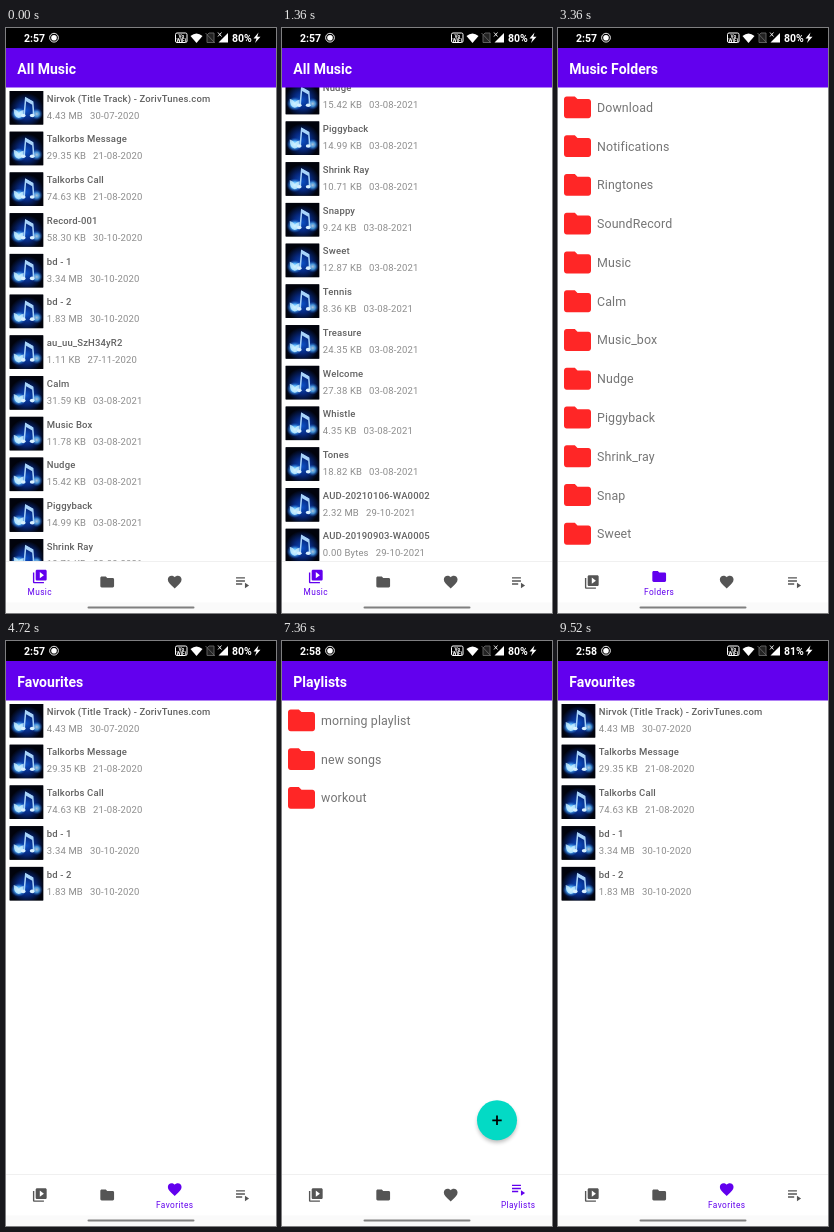
Recreate the animation shown at these times as an HTML page. Size 270 px wide and 585 px high, loop 9.6 s.

```html
<!DOCTYPE html>
<html lang="en">
<head>
<meta charset="utf-8">
<title>Music player</title>
<style>
  html, body { margin: 0; width: 100%; height: 100%; overflow: hidden; background: #fff; }
  svg { display: block; width: 270px; height: 585px; font-family: Roboto, sans-serif; }
  .name { font-size: 9.5px; font-weight: 500; letter-spacing: .15px; fill: #616161; }
  .info { font-size: 9.5px; letter-spacing: .15px; fill: #8c8c8c; }
  .folder { font-size: 12.4px; letter-spacing: .12px; fill: #757575; }
  .title { font-size: 14px; font-weight: 700; fill: #fff; }
  .label { font-size: 8.3px; letter-spacing: .4px; text-anchor: middle; }
  .status { font-size: 10.5px; font-weight: 700; fill: #fff; }
  .badge { font-size: 4.800px; font-weight: 700; fill: #fff; text-anchor: middle; }
</style>
</head>
<body>
<svg viewBox="0 0 270 585">
  <defs>
    <radialGradient id="glowBlue" cx=".5" cy=".58" r=".52">
      <stop offset="0" stop-color="#0c4fc4"/>
      <stop offset=".5" stop-color="#06287e"/>
      <stop offset="1" stop-color="#01030c"/>
    </radialGradient>
    <radialGradient id="glowWhite">
      <stop offset="0" stop-color="#e6faff"/>
      <stop offset=".45" stop-color="#58b8ff"/>
      <stop offset="1" stop-color="#0c4fc4" stop-opacity="0"/>
    </radialGradient>
    <filter id="soft" x="-50%" y="-50%" width="200%" height="200%"><feGaussianBlur stdDeviation="2.2"/></filter>
    <clipPath id="navClip"><rect y="534" width="270" height="40.5"/></clipPath>
    <path id="folderIcon" d="M10 4H4c-1.1 0-2 .9-2 2v12c0 1.1.9 2 2 2h16c1.1 0 2-.9 2-2V8c0-1.1-.9-2-2-2h-8z"/>
    <g id="thumb">
      <rect width="33.5" height="33.5" fill="#01030c"/>
      <rect width="33.5" height="33.5" fill="url(#glowBlue)"/>
      <ellipse cx="9" cy="23" rx="8" ry="7" fill="url(#glowWhite)"/>
      <ellipse cx="27" cy="23" rx="6" ry="6" fill="url(#glowWhite)" opacity=".75"/>
      <path d="M4 18q4 1 5 4q2-3 5-3q0 7-5 8q-5-1-5-9z" fill="#c9efff" opacity=".8"/>
      <path d="M14.500 24L16 7l7 4 1 13" fill="none" stroke="#a9d4fa" stroke-width="1.500"/>
      <path d="M16 6.500l7 4v3.500l-7-4z" fill="#a9d4fa"/>
      <ellipse cx="13.500" cy="24.500" rx="2.400" ry="1.800" fill="#d8f0ff"/>
      <ellipse cx="22.500" cy="24.500" rx="2.400" ry="1.800" fill="#d8f0ff"/>
    </g>
  </defs>
  <rect width="270" height="585" fill="#fff"/>
  <g id="screens"></g>
  <path id="overscroll" fill="#6200ee"/>

  <rect width="270" height="20"/>
  <rect y="20" width="270" height="39.500" fill="#6200ee"/>
  <text id="title" class="title" x="11.300" y="45.800"></text>
  <text id="clock" class="status" x="18" y="13.600"></text>
  <circle cx="48" cy="9.700" r="4.400" fill="none" stroke="#fff" stroke-width=".9"/>
  <circle cx="48" cy="9.700" r="2.800" fill="#fff"/>
  <rect x="169.500" y="5" width="11.500" height="9.500" rx="1.500" fill="none" stroke="#fff"/>
  <text class="badge" x="175.300" y="9.500">Vo</text>
  <text class="badge" x="175.300" y="13.700">WiFi</text>
  <path d="M184.500 8q6-5 12 0l-6 7z" fill="#fff"/>
  <path d="M201 7l2-2h5v9.500h-7zM199.500 5l9.500 10" fill="#222" stroke="#666" stroke-width=".9"/>
  <path d="M222 5v9.500h-9.500z" fill="#fff"/>
  <path d="M212 4.500l3.500 4m0-4l-3.500 4" stroke="#fff" stroke-width=".9"/>
  <text id="battery" class="status" x="226" y="13.600"></text>
  <path d="M252.500 4.500l-5 6h3l-1.500 4.500 5.500-6.300h-3.200z" fill="#fff"/>

  <rect y="534" width="270" height="51" fill="#fff"/>
  <rect y="533" width="270" height="1" fill="#f0f0f0"/>
  <rect y="574.500" width="270" height="10.500" fill="#fafafa"/>
  <g clip-path="url(#navClip)"><circle id="ripple" cy="554"/></g>
  <g id="nav"></g>
  <circle id="press" cy="557" fill="#d8d4e4"/>
  <rect x="81.500" y="578.600" width="107" height="2" rx="1" fill="#808080"/>
</svg>
<script>
const LOOP = 9600, STEP = 80;
const PURPLE = '#6200ee', GREY = '#555';
const byId = id => document.getElementById(id);
const clamp = x => Math.max(0, Math.min(1, x));
const ramp = (t, from, to) => clamp((t - from) / (to - from));
const smooth = (t, from, to) => { const p = ramp(t, from, to); return p * p * (3 - 2 * p); };
const set = (el, attrs) => { for (const k in attrs) el.setAttribute(k, attrs[k]); };

const songs = `Nirvok (Title Track) - ZorivTunes.com|4.43 MB|30-07-2020
Talkorbs Message|29.35 KB|21-08-2020
Talkorbs Call|74.63 KB|21-08-2020
Record-001|58.30 KB|30-10-2020
bd - 1|3.34 MB|30-10-2020
bd - 2|1.83 MB|30-10-2020
au_uu_SzH34yR2|1.11 KB|27-11-2020
Calm|31.59 KB|03-08-2021
Music Box|11.78 KB|03-08-2021
Nudge|15.42 KB|03-08-2021
Piggyback|14.99 KB|03-08-2021
Shrink Ray|10.71 KB|03-08-2021
Snappy|9.24 KB|03-08-2021
Sweet|12.87 KB|03-08-2021
Tennis|8.36 KB|03-08-2021
Treasure|24.35 KB|03-08-2021
Welcome|27.38 KB|03-08-2021
Whistle|4.35 KB|03-08-2021
Tones|18.82 KB|03-08-2021
AUD-20210106-WA0002|2.32 MB|29-10-2021
AUD-20190903-WA0005|0.00 Bytes|29-10-2021
AUD-20190622-WA0000|0.00 Bytes|29-10-2021
AUD-20200623-WA0001|0.00 Bytes|29-10-2021
AUD-20200711-WA0003|0.00 Bytes|29-10-2021
AUD-20200802-WA0004|0.00 Bytes|29-10-2021`.split('\n').map(line => line.split('|'));

const folders = ['Download', 'Notifications', 'Ringtones', 'SoundRecord', 'Music', 'Calm', 'Music_box',
  'Nudge', 'Piggyback', 'Shrink_ray', 'Snap', 'Sweet', 'Tennis', 'Treasure', 'Welcome', 'Whistle', 'Tones'];

const songRow = ([name, size, date], i) => `<g transform="translate(0 ${63 + i * 40.73})">
  <use href="#thumb" x="3.700"/>
  <text class="name" x="40.800" y="10.700">${name}</text>
  <text class="info" x="40.800" y="27.700">${size}<tspan dx="7">${date}</tspan></text></g>`;

const folderRow = (name, i) => `<g transform="translate(0 ${79.3 + i * 38.77})">
  <use href="#folderIcon" transform="translate(3.300 -16.400) scale(1.350 1.370)" fill="#ff2626"/>
  <text class="folder" x="39" y="4.500">${name}</text></g>`;

const fab = `<circle cx="215" cy="482" r="19.500" opacity=".28" filter="url(#soft)"/>
  <circle cx="215" cy="479.300" r="20" fill="#03dac5"/>
  <path d="M210.300 479.300h9.400m-4.700-4.700v9.400" stroke="#000" stroke-width="1.800"/>`;

const tabs = [
  { title: 'All Music', label: 'Music', x: 33.8,
    icon: 'M4 6H2v14c0 1.100.9 2 2 2h14v-2H4zM20 2H8c-1.100 0-2 .9-2 2v12c0 1.100.9 2 2 2h12c1.100 0 2-.9 2-2V4c0-1.100-.9-2-2-2zM12 14.500v-9l6 4.500z',
    body: songs.map(songRow) },
  { title: 'Music Folders', label: 'Folders', x: 101.2,
    icon: byId('folderIcon').getAttribute('d'),
    body: folders.map(folderRow) },
  { title: 'Favourites', label: 'Favorites', x: 168.7,
    icon: 'M12 21.350l-1.450-1.320C5.400 15.360 2 12.280 2 8.500 2 5.420 4.420 3 7.500 3c1.740 0 3.410.81 4.500 2.090C13.090 3.810 14.760 3 16.500 3 19.580 3 22 5.420 22 8.500c0 3.780-3.400 6.860-8.550 11.540z',
    body: [0, 1, 2, 4, 5].map((n, i) => songRow(songs[n], i)) },
  { title: 'Playlists', label: 'Playlists', x: 236.2,
    icon: 'M3 5h13v2H3zM3 9.500h13v2H3zM3 14h9v2H3zM16 13v8l6-4z',
    body: ['morning playlist', 'new songs', 'workout'].map(folderRow).concat(fab) }
];

byId('screens').innerHTML = tabs.map(tab => `<g>${tab.body.join('')}</g>`).join('');
byId('nav').innerHTML = tabs.map(({ icon, label, x }) => `<g>
  <g><path fill-rule="evenodd" transform="scale(.687) translate(-12 -12)" d="${icon}"/></g>
  <text class="label" x="${x}" y="566.900">${label}</text></g>`).join('');
const screens = [...byId('screens').children];
const navItems = [...byId('nav').children];

// Each tap opens a tab: title first, then the content and the raised label.
const taps = [
  { at: -2000, tab: 0 }, { at: 2720, tab: 1 }, { at: 4080, tab: 2 },
  { at: 5440, tab: 3 }, { at: 8240, tab: 2 }
];

function draw(t) {
  const n = taps.findLastIndex(tap => t >= tap.at);
  const { at, tab } = taps[n];
  const previous = n ? taps[n - 1].tab : -1;
  const age = t - at;
  const opened = smooth(age, 240, 480);
  const chosen = age >= 80 ? tab : previous;

  byId('title').textContent = tabs[chosen].title;
  byId('clock').textContent = t < 7120 ? '2:57' : '2:58';
  byId('battery').textContent = t < 9200 ? '80%' : '81%';

  tabs.forEach((item, i) => {
    const shown = i === tab ? opened : i === previous ? 1 - opened : 0;
    const color = i === chosen ? PURPLE : GREY;
    const [icon, label] = navItems[i].children;
    set(screens[i], { opacity: shown, display: shown ? 'inline' : 'none' });
    set(icon, { transform: `translate(${item.x} ${554 - 5.5 * shown})`, fill: color });
    set(label, { opacity: shown, fill: color });
  });

  const songScroll = 470 * (smooth(t, 160, 1120) - smooth(t, 1200, 1760));
  const folderScroll = 190 * smooth(t, 3440, 3920);
  set(screens[0], { transform: `translate(0 ${-songScroll})` });
  set(screens[1], { transform: `translate(0 ${-folderScroll})` });

  const pull = ramp(t, 1680, 1920) * (1 - ramp(t, 1920, 2240));
  set(byId('overscroll'), {
    d: `M0 59V${59 + 5 * pull}Q190 ${59 + 42 * pull} 270 ${59 + 9 * pull}V59Z`,
    opacity: .11 * pull
  });

  const fade = 1 - ramp(age, 240, 480);
  set(byId('ripple'), { cx: tabs[tab].x + 2.3, r: 10 + 17 * ramp(age, 0, 160), opacity: .18 * fade });
  set(byId('press'), { cx: tabs[tab].x + 5, r: 8 * ramp(age, 0, 160), opacity: .55 * fade });
}

function tick(now) {
  draw(Math.floor((now % LOOP) / STEP) * STEP);
  requestAnimationFrame(tick);
}
draw(0);
requestAnimationFrame(tick);
</script>
</body>
</html>
```
